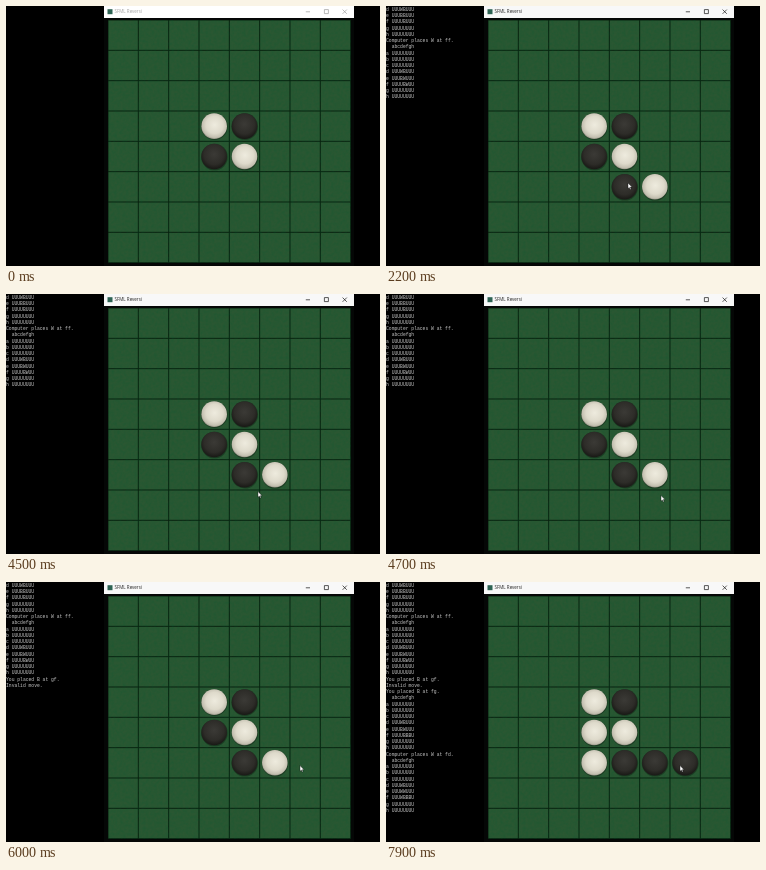
Animation, 374 px wide and 260 px high, one loop 8 s. Source, as an HTML page:

```html
<!DOCTYPE html>
<html lang="en">
<head>
<meta charset="utf-8">
<title>SFML Reversi</title>
<style>
html, body { margin: 0; width: 100%; height: 100%; overflow: hidden; background: #000; }
body { position: relative; }
svg { position: absolute; left: 0; top: 0; display: block; }
#log {
  position: absolute; left: 0; top: .9px; margin: 0; width: 98px; overflow: hidden;
  font: 4.7px/6.25px "Liberation Mono", "DejaVu Sans Mono", monospace; color: #c6c6c6;
}
#title { font: 4.5px "Open Sans", sans-serif; }
#bar { fill: #fff; color: #a2a2a2; }
#bar.active { fill: #f8f8f8; color: #222; }
#alert { font: 18px "Liberation Serif", serif; text-anchor: middle; }
</style>
</head>
<body>
<pre id="log"></pre>
<svg width="374" height="260" viewBox="0 0 374 260">
  <defs>
    <radialGradient id="W" cx=".52" cy=".45" r=".56">
      <stop offset="0" stop-color="#eeebde"/>
      <stop offset=".6" stop-color="#dedacb"/>
      <stop offset=".88" stop-color="#c3bfb0"/>
      <stop offset="1" stop-color="#8f8d7e"/>
    </radialGradient>
    <radialGradient id="B" cx=".5" cy=".42" r=".6">
      <stop offset="0" stop-color="#3b3a36"/>
      <stop offset=".65" stop-color="#2d2c28"/>
      <stop offset="1" stop-color="#161613"/>
    </radialGradient>
    <filter id="felt" x="0" y="0" width="1" height="1">
      <feTurbulence type="fractalNoise" baseFrequency=".35" numOctaves="2" seed="4"/>
      <feColorMatrix values="0 0 0 0 0  0 0 0 0 .1  0 0 0 0 .03  .7 0 0 0 -.22"/>
    </filter>
    <filter id="soft" x="-.2" y="-.5" width="1.4" height="2"><feGaussianBlur stdDeviation="1.2"/></filter>
  </defs>
  <rect x="98" width="250" height="260" fill="#050706"/>
  <g id="bar">
    <rect x="98" width="250" height="12"/>
    <rect x="101.5" y="3.2" width="5" height="5" fill="#2d6353"/>
    <text id="title" x="108.5" y="7.4" fill="currentColor">SFML Reversi</text>
    <path d="M299.8 5.8h4.2M318.4 3.6h4v4h-4zM336.6 3.6l4.2 4.2M340.8 3.6l-4.2 4.2" fill="none" stroke="currentColor" stroke-width=".75"/>
  </g>
  <rect x="102" y="14" width="243" height="243" fill="#08220f"/>
  <g id="cells" fill="#2a5732"></g>
  <rect x="102" y="14" width="243" height="243" filter="url(#felt)" opacity=".55"/>
  <g id="discs"></g>
  <g id="alert">
    <text x="223.6" y="144.8" fill="#000" stroke="#000" stroke-width="2" filter="url(#soft)">Invalid Move!</text>
    <text x="222.5" y="143" fill="#fff" stroke="#fff" stroke-width=".35">Invalid Move!</text>
  </g>
  <path id="cursor" d="M0 0V5.6L1.3 4.5L2.2 6.4L3.1 6L2.3 4.1H4Z" fill="#fff" stroke="#111" stroke-width=".4"/>
</svg>
<script>
const $ = id => document.getElementById(id);
const LOOP = 8000, STEP = 100, CELL = 30.33, LEFT = 102, TOP = 14;
const ROWS = 'abcdefgh';

// Pieces as row letter + column letter + colour
const opening = { dd: 'W', de: 'B', ed: 'B', ee: 'W' };
const first = { ...opening, ee: 'B', fe: 'B' };
const reply = { ...first, ee: 'W', ff: 'W' };
const second = { ...reply, ff: 'B', fg: 'B' };
const last = { ...second, ed: 'W', fd: 'W' };

const rows = (board, from = 0) => [...ROWS].slice(from).map(r =>
  r + ' ' + [...ROWS].map(c => board[r + c] || 'U').join(''));
const table = board => ['  ' + ROWS, ...rows(board)];

const events = [
  { at: 0, board: opening, lines: [] },
  { at: 1100, board: first, lines: [...rows(first, 3), 'Computer places W at ff.'] },
  { at: 2200, board: reply, lines: table(reply) },
  { at: 4900, board: reply, lines: ['You placed B at gf.', 'Invalid move.'] },
  { at: 6100, board: second, lines: ['You placed B at fg.', ...table(second), 'Computer places W at fd.'] },
  { at: 7100, board: last, lines: table(last) }
];

// Cursor keys: time, x, y
const path = [
  [200, 371, 221], [500, 315, 204], [800, 248, 181], [900, 242, 177],
  [3200, 242, 177], [3300, 233, 173], [3600, 206, 157], [3800, 195, 163],
  [4100, 238, 176], [4300, 244, 184], [4500, 252, 197.6], [4700, 275, 201.5],
  [5200, 275, 201.5], [5600, 286, 192], [5900, 293.5, 184], [6000, 294, 183.6], [LOOP, 294, 183.6]
];

for (let i = 0; i < 64; i++) {
  const x = LEFT + (i % 8) * CELL + .5, y = TOP + (i >> 3) * CELL + .5;
  $('cells').innerHTML += `<rect x="${x}" y="${y}" width="${CELL - 1}" height="${CELL - 1}"/>`;
}

function drawBoard(board) {
  $('discs').innerHTML = Object.entries(board).map(([pos, colour]) => {
    const [r, c] = [...pos].map(ch => ROWS.indexOf(ch) + .5);
    const x = LEFT + c * CELL, y = TOP + r * CELL;
    return `<circle cx="${x + .3}" cy="${y + .5}" r="13.3" opacity=".3"/>` +
      `<circle cx="${x}" cy="${y}" r="12.8" fill="url(#${colour})"/>`;
  }).join('');
}

function moveCursor(t) {
  const shown = t >= path[0][0];
  $('cursor').style.display = shown ? '' : 'none';
  if (!shown) return;
  const i = path.findIndex(key => key[0] > t);
  const [a, b] = [path[i - 1], path[i]];
  const k = (t - a[0]) / (b[0] - a[0]);
  const mix = n => a[n] + (b[n] - a[n]) * k;
  $('cursor').setAttribute('transform', `translate(${mix(1)} ${mix(2)})`);
}

let stage = -1;
const start = performance.now();

function render(now) {
  const time = Math.max(0, now - start) % LOOP;
  const t = Math.floor(time / STEP) * STEP;
  const past = events.filter(e => e.at <= t);
  if (past.length !== stage) {
    stage = past.length;
    drawBoard(past[stage - 1].board);
    $('log').textContent = past.flatMap(e => e.lines).join('\n');
  }
  $('bar').classList.toggle('active', t >= 1100);
  $('alert').style.display = t >= 4900 && t < 5900 ? '' : 'none';
  moveCursor(t);
  requestAnimationFrame(render);
}
render(start);
</script>
</body>
</html>
```
